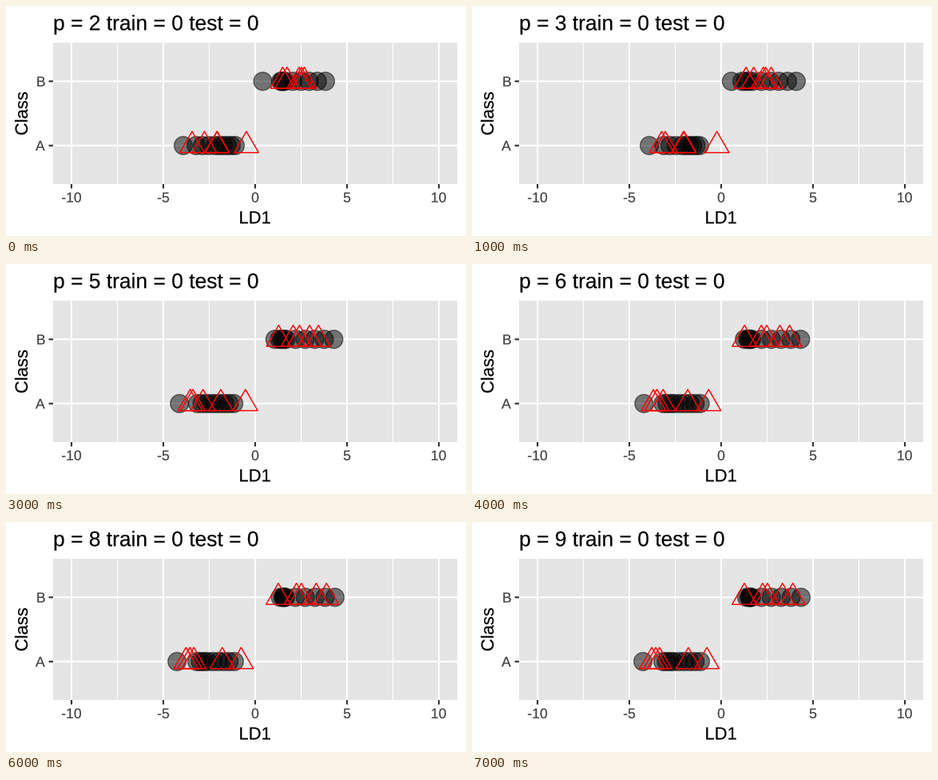
These frames come from a looping animation (576 by 288 pixels, 8000 ms). A matplotlib script:

```python
import matplotlib.pyplot as plt
import numpy as np
from matplotlib.animation import FuncAnimation
from matplotlib.collections import PolyCollection
from matplotlib.patches import PathPatch, Rectangle
from matplotlib.textpath import TextPath
from matplotlib.transforms import Affine2D

W, H, DPI = 576, 288, 72  # at 72 dpi one point is one pixel
LEFT, RIGHT, TOP, BOTTOM = 59, 565, 46, 223
ZERO, UNIT = 312, 23
ROWS = {"A": 174.75, "B": 94.3}
RADIUS, STROKE, GRID = 11.38, 1.42, 2.13

plt.rcParams["font.family"] = "Liberation Sans"

# Key positions at the start, at p = 4 and at rest.
# The ten training points are spread evenly between the keys at these ranks.
RANKS = [0, 1, 4, 9]
TRAIN = {
    "A": [(222, 238, 262, 287), (222, 241, 264, 284), (214, 239, 252, 286)],
    "B": [(321.5, 344, 349, 400), (326, 336, 352, 408), (344, 347, 350, 412)],
}
TEST = {
    "A": [(233, 248.5, 264, 264.5, 301), (239, 240, 265, 266, 308.5),
          (225, 230, 234.5, 271, 294)],
    "B": [(346.5, 352, 367, 370, 373.5), (342, 353, 364, 367, 375),
          (341, 364, 370, 389, 402)],
}


def pose(keys, p):
    """Ease from the start to the middle pose, then settle towards rest."""
    start, middle, rest = np.array(keys, dtype=float)
    if p <= 4:
        return middle + (start - middle) * ((4 - p) / 2) ** 2
    return rest + (middle - rest) * 0.4 ** (p - 4)


def train_positions(keys, p):
    return np.interp(range(10), RANKS, pose(keys, p))


def place(shape, groups, locate, p):
    return [shape + (x, ROWS[row])
            for row, keys in groups.items() for x in locate(keys, p)]


def polygon(radius, degrees):
    angle = np.radians(degrees)
    return radius * np.column_stack([np.cos(angle), np.sin(angle)])


circle = polygon(RADIUS, np.arange(0, 360, 5))
# Triangle with the same area as the circle
triangle = polygon(RADIUS * np.sqrt(4 * np.pi / 27 ** 0.5), [-90, 30, 150])

fig = plt.figure(figsize=(W / DPI, H / DPI), dpi=DPI, facecolor="white")
ax = fig.add_axes([0, 0, 1, 1])
ax.set_xlim(0, W)
ax.set_ylim(H, 0)
ax.axis("off")


def line(x, y, color, width):
    ax.plot(x, y, color=color, lw=width, zorder=1,
            solid_capstyle="butt", snap=False)


def text_path(x, y, text, px, align="center", angle=0):
    """Outline of a text on its baseline, aligned by its ink."""
    path = TextPath((0, 0), text, size=px)
    box = path.get_extents()
    shift = {"left": 0, "center": (box.x0 + box.x1) / 2, "right": box.x1}[align]
    move = Affine2D().translate(-shift, 0).scale(1, -1).rotate_deg(-angle)
    return path.transformed(move.translate(x, y))


def label(*args, color="black", **kw):
    patch = PathPatch(text_path(*args, **kw), fc=color, ec=color, lw=0.2,
                      snap=False)
    return ax.add_patch(patch)


def title_path(p):
    return text_path(LEFT, 30.2, f"p = {p} train = 0 test = 0", 26.4, "left")


ax.add_patch(Rectangle((LEFT, TOP), RIGHT - LEFT, BOTTOM - TOP,
                       fc="#e5e5e5", ec="none", zorder=0))
for value in np.arange(-7.5, 10, 5):
    x = ZERO + UNIT * value
    line([x, x], [TOP, BOTTOM], "white", GRID / 2)
for value in range(-10, 11, 5):
    x = ZERO + UNIT * value
    line([x, x], [TOP, BOTTOM], "white", GRID)
    line([x, x], [BOTTOM, BOTTOM + 5.5], "#333333", GRID)
    label(x, 245.7, str(value), 17.6, color="#404040")
for name, y in ROWS.items():
    line([LEFT, RIGHT], [y, y], "white", GRID)
    line([LEFT - 5.5, LEFT], [y, y], "#333333", GRID)
    label(48.7, y + 6.3, name, 17.6, "right", color="#404040")

label(ZERO, 272.3, "LD1", 22)
label(26.9, (TOP + BOTTOM) / 2, "Class", 22, angle=90)
title = ax.add_patch(PathPatch(title_path(2), color="black", lw=0.2, snap=False))

train = PolyCollection([], facecolors=(0, 0, 0, 0.5), edgecolors=(0, 0, 0, 0.5),
                       linewidths=STROKE, zorder=3)
test = PolyCollection([], facecolors="none", edgecolors="red",
                      linewidths=STROKE, joinstyle="round", zorder=4)
for group in (train, test):
    group.set_snap(False)
    ax.add_collection(group, autolim=False)


def draw(i):
    p = i + 2
    title.set_path(title_path(p))
    train.set_verts(place(circle, TRAIN, train_positions, p))
    test.set_verts(place(triangle, TEST, pose, p))
    return title, train, test


anim = FuncAnimation(fig, draw, frames=8, interval=1000,
                     init_func=lambda: draw(0), repeat=True, repeat_delay=0)
plt.show()
```
